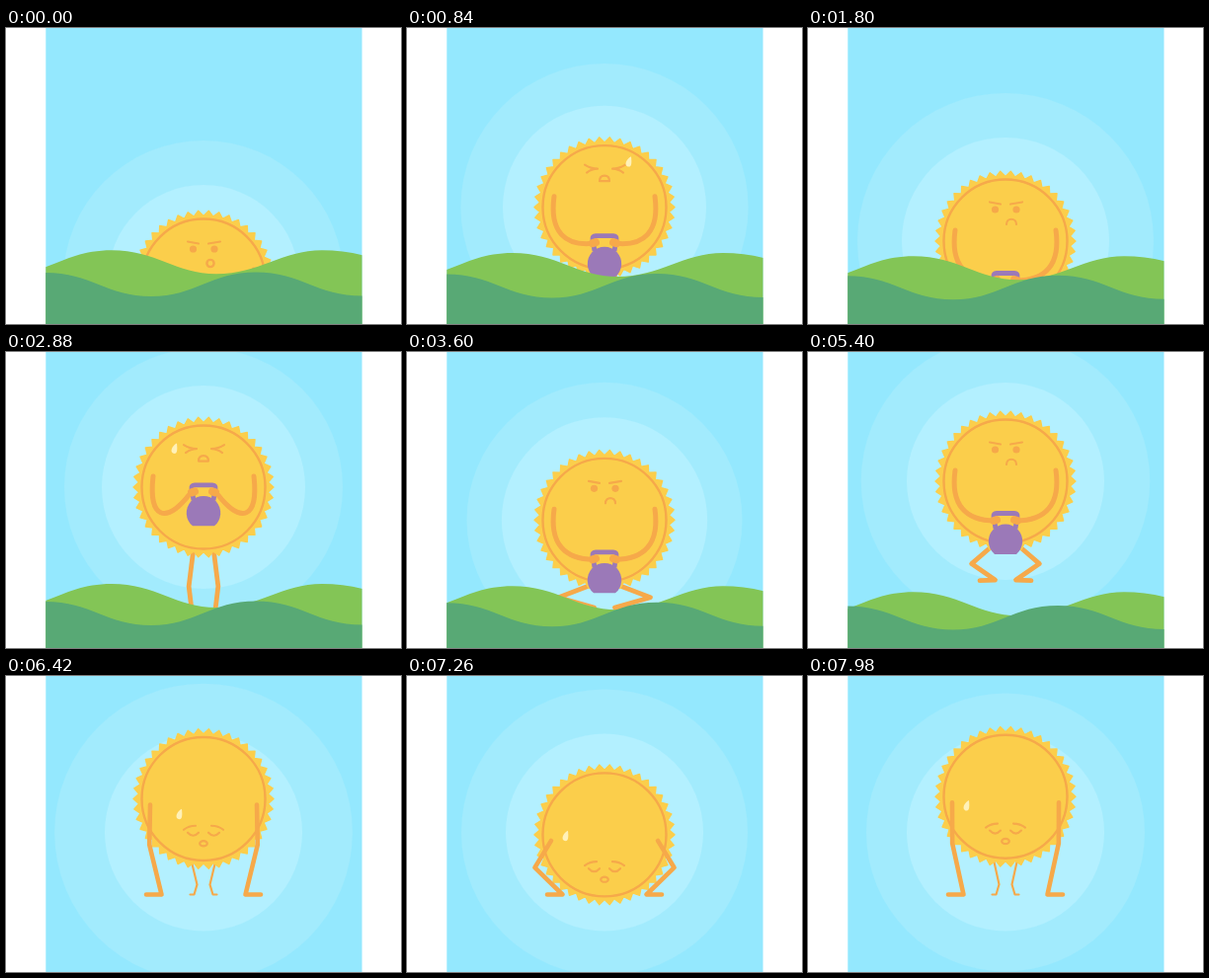
Recreate the animation shown at these times as an HTML page. Size 400 by 300 pixels, loop 8000 ms.

```html
<!DOCTYPE html>
<html lang="en">
<head>
<meta charset="utf-8">
<title>Sun workout</title>
<style>
html, body { margin: 0; width: 100%; height: 100%; overflow: hidden; background: #fff; }
svg { display: block; width: 100vw; height: 100vh; }
.line { fill: none; stroke: #f6a94a; stroke-linecap: round; stroke-linejoin: round; }
</style>
</head>
<body>
<svg viewBox="0 0 400 300">
  <defs><clipPath id="sky"><rect x="40.300" width="320.200" height="300"/></clipPath></defs>
  <g clip-path="url(#sky)">
    <rect x="40" width="321" height="300" fill="#94e8fe"/>
    <circle id="outer" cx="200" fill="#a2ebfd"/>
    <circle id="inner" cx="200" fill="#b3f0ff"/>
    <path id="legs" class="line"/>
    <g id="sun">
      <path id="disc" fill="#fbce4b" stroke="#fbce4b" stroke-width="1.400" stroke-linejoin="round"/>
      <circle r="62.5" class="line" stroke-width="2.4"/>
      <g id="open">
        <path class="line" stroke-width="2.2" d="M-16-39.5L-5-37.5M5-37.5L17-39.5"/>
        <g fill="#f6a94a"><circle cx="-10.5" cy="-32" r="3.6"/><circle cx="11" cy="-32" r="3.6"/></g>
        <circle id="blow" class="line" cx="7" cy="-17.5" r="3.6" stroke-width="2.4"/>
        <path id="frown" class="line" stroke-width="2.2" d="M1-17C1-24 11-24 11-17"/>
      </g>
      <path id="squint" class="line" stroke-width="2.2"
        d="M-20-43Q-14-39-7-39Q-13-39-18-35M21-43Q15-39 8-39Q14-39 19-35M-5-26.500Q-5-32 0-32Q5-32 5-26.500Z"/>
      <path id="calm" class="line" stroke-width="2.2" transform="translate(0 -.7)"
        d="M-20 32Q-15 28-8 28M8 28Q15 28 20 32M-16 35Q-10.500 41-5 35M5 35Q10.500 41 16 35M-3.800 46a3.800 2.600 0 1 0 7.600 0a3.800 2.600 0 1 0-7.600 0"/>
      <path id="drop" fill="#fff1b8" d="M3-5.500C-2-3-4.500 3.500-.5 4.800C4 6 3.500 0 3-5.500Z"/>
      <path id="arms" class="line"/>
      <g id="bell">
        <path d="M-10 18L-12 6Q-12.500 2.500-9 2.500H9Q12.500 2.500 12 6L10 18" fill="none" stroke="#9b79b8" stroke-width="4.800"/>
        <path d="M-11 44A17.200 17.200 0 1 1 11 44Z" fill="#9b79b8"/>
        <path d="M-12 10L-9 9M12 10L9 9" class="line" stroke-width="8"/>
      </g>
    </g>
    <g id="hills">
      <path id="back" fill="#83c556"/>
      <path id="front" fill="#58a975" d="M40 248C86 248 102 272 147 272S207 247.500 253 247.500S314 271.500 361 271.500V330H40Z"/>
    </g>
  </g>
</svg>
<script>
const LOOP = 8000, CUT = 5460, REP = 1680, PUSH = 1884;
const el = {};
document.querySelectorAll('[id]').forEach(n => el[n.id] = n);
const set = (n, attrs) => { for (const k in attrs) n.setAttribute(k, attrs[k]); };
const show = (n, on) => n.style.display = on ? '' : 'none';
const move = (n, x, y) => n.setAttribute('transform', `translate(${x} ${y})`);
const mix = (a, b, u) => a + (b - a) * u;

// Smooth curve through [time, value] keys, flat at every extreme
function curve(keys, t) {
  let i = 0;
  while (i < keys.length - 2 && t > keys[i + 1][0]) i++;
  const rate = k => keys[k] && keys[k + 1] ? (keys[k + 1][1] - keys[k][1]) / (keys[k + 1][0] - keys[k][0]) : 0;
  const slope = k => {
    const a = rate(k - 1), b = rate(k);
    return a * b > 0 ? 2 * a * b / (a + b) : 0;
  };
  const [t0, a] = keys[i], [t1, b] = keys[i + 1], d = t1 - t0;
  const u = Math.min(1, Math.max(0, (t - t0) / d)), s = u * u * (3 - 2 * u);
  return mix(a, b, s) + d * u * (1 - u) * (slope(i) * (1 - u) - slope(i + 1) * u);
}

// Draws the same line on both sides of the axis
const mirror = (make, cx) => make(x => cx - x) + make(x => cx + x);

const height = [[0, 142], [150, 142], [300, 136.5], [780, 92.5], [900, 82.3], [1140, 100], [1620, 142], [1680, 142]];
const lifting = [[0, .2], [240, 1], [360, 1], [740, 0], [1460, 0], [1620, .1], [1680, .2]];
const glow = [[0, 97], [840, 103], [1800, 105], [2880, 103], [4200, 105], [5400, 100]];
const halo = [[0, 142], [1800, 150], [2880, 141], [4200, 139], [6300, 151], [8000, 141]];

function squat(t) {
  const x = (t - 900) / REP, p = (t - 900 + REP) % REP;
  const feet = 322 - 46.8 * x + 4.8 * x * x;
  const off = curve(height, p), cy = feet - off, bend = (142 - off) / 41;
  const lift = curve(lifting, p), strain = p < 620 || p > 1380;

  set(el.inner, { cy, r: curve(glow, t) });
  set(el.outer, { cy });
  move(el.sun, 200, cy);
  set(el.legs, {
    'stroke-width': 4.8,
    d: mirror(f => `M${f(10 + 5 * bend)} ${cy + 67}L${f(14.5 + 19 * bend * bend)} ${feet - 39 + 22 * bend}L${f(10.5)} ${feet}L${f(26)} ${feet + .5}`, 200)
  });
  set(el.arms, {
    'stroke-width': 5,
    d: mirror(f => `M${f(51)} -11C${f(56)} ${mix(24, 32, lift)} ${f(mix(40, 38, lift))} ${mix(40, 38, lift)} ${f(mix(11, 14, lift))} ${mix(40, 7, lift)}`, 0)
  });
  move(el.bell, 0, mix(30, -4.7, lift));

  show(el.open, !strain);
  show(el.squint, strain);
  show(el.blow, p < 850);
  show(el.frown, p >= 850);
  show(el.drop, strain);
  if (p < 620) move(el.drop, -30, -43 + p / 75);
  else move(el.drop, 24, -50 + (p - 1380) / 60);

  const y = 225.3 + t / 300;
  set(el.back, { d: `M40 ${y + 17}C62 ${y + 9} 78 ${y} 107 ${y}C152 ${y} 172 ${y + 24} 213 ${y + 24}C256 ${y + 24} 280 ${y} 320 ${y}Q341 ${y} 361 ${y + 5}V330H40Z` });
  move(el.front, 0, t * .00175);
}

function pushUp(t) {
  const p = (t - 6228 + PUSH) % PUSH;
  const dip = (1 - Math.cos(2 * Math.PI * p / PUSH)) / 2, cy = 120.3 + 41.5 * dip;
  set(el.inner, { cy: 158.5, r: 100 });
  set(el.outer, { cy: 158.5 });
  move(el.sun, 200, cy);
  set(el.legs, {
    'stroke-width': 2.2,
    d: mirror(f => `M${f(12)} ${cy + 64}L${f(6.5)} ${211 + 4 * dip}L${f(9.5)} 221.500L${f(13.5)} 221.500`, 200)
  });
  const hand = 221.5 - cy;
  set(el.arms, {
    'stroke-width': 4.6,
    d: mirror(f => `M${f(54)} 6L${f(53 + 18 * dip)} ${mix(48, 33, dip)}L${f(42.5)} ${hand}L${f(58)} ${hand}`, 0)
  });
  const first = p < 1000;
  move(el.drop, first ? -25 : -40, first ? 13 + p / 70 : 1 + (p - 1000) / 90);
}

function draw(t) {
  const squats = t < CUT;
  for (const k of ['open', 'squint', 'bell', 'hills']) show(el[k], squats);
  show(el.calm, !squats);
  show(el.drop, true);
  set(el.outer, { r: curve(halo, t) });
  (squats ? squat : pushUp)(t);
}

const TEETH = 42;
set(el.disc, {
  d: 'M' + Array.from({ length: TEETH * 2 }, (_, i) => {
    const a = Math.PI * i / TEETH, r = i % 2 ? 71 : 65.6;
    return `${(r * Math.sin(a)).toFixed(2)} ${(-r * Math.cos(a)).toFixed(2)}`;
  }).join('L') + 'Z'
});

const start = performance.now();
function tick() {
  draw((performance.now() - start) % LOOP);
  requestAnimationFrame(tick);
}
tick();
</script>
</body>
</html>
```
